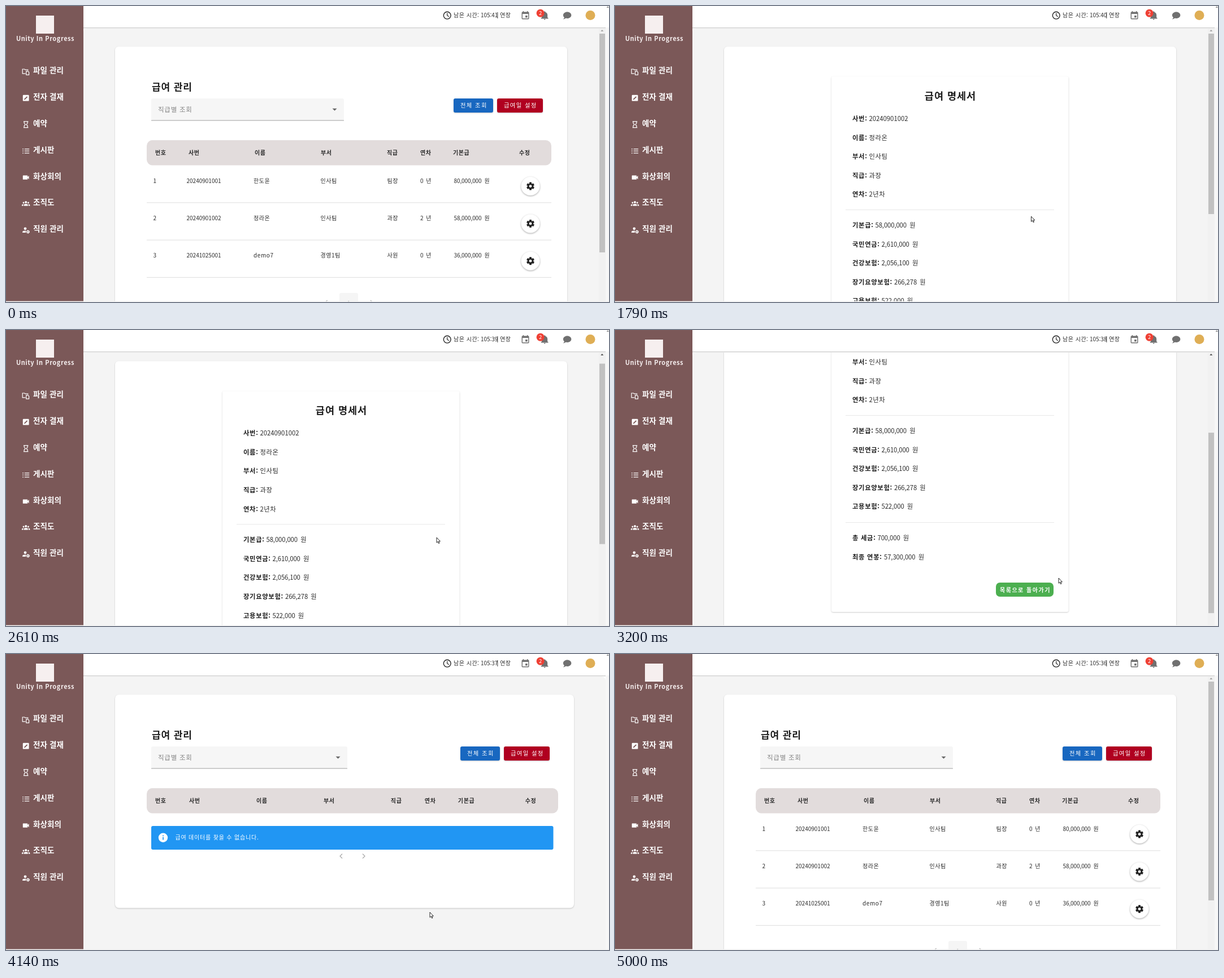
These frames come from a looping animation (1067x525 px, 5140 ms). An HTML page:

```html
<!DOCTYPE html>
<html lang="ko">
<head>
<meta charset="utf-8">
<title>급여 관리</title>
<style>
html, body { margin: 0; width: 100%; height: 100%; overflow: hidden; background: #fff; }
svg { display: block; width: 1067px; height: 525px; }
text { font-family: "Noto Sans CJK KR", "Noto Sans CJK", "Noto Sans CJK JP", sans-serif; white-space: pre; }
.card { filter: drop-shadow(0 1px 1px rgba(0,0,0,.2)); }
.fab { filter: drop-shadow(0 1px 1.5px rgba(0,0,0,.35)); }
.won { word-spacing: 2.2px; }
</style>
</head>
<body>
<svg id="stage" viewBox="0 0 1067 525"></svg>
<script>
const LOOP = 5140;
const INK = '#2b2b2b';

// [first, last, count] of evenly spaced screen updates
const RUNS = [
  [0, 0, 1], [150, 640, 8], [740, 1140, 6], [1270, 1470, 4],
  [1660, 1920, 4], [1990, 2140, 3], [2210, 2420, 4], [2610, 3070, 8],
  [3140, 3200, 2], [3270, 3470, 4], [3930, 4140, 4], [4200, 4400, 4],
  [4470, 4740, 5], [5000, 5000, 1]
];
const ticks = RUNS.flatMap(([a, b, n]) =>
  Array.from({ length: n }, (_, i) => Math.floor(a + (b - a) * i / Math.max(1, n - 1))));

// time, x, y
const POINTER = [
  [150, 1036, 514], [360, 930, 420], [500, 850, 350], [640, 800, 318],
  [740, 786, 322], [900, 760, 345], [1140, 736, 370], [1660, 736, 371],
  [1920, 737.5, 377.5], [2140, 737.5, 377.5], [2420, 762, 368], [2610, 762, 368],
  [3070, 812, 425], [3140, 800, 432], [3200, 785, 440], [3470, 750, 458],
  [4400, 750, 458], [4680, 1014, 513]
];
const SCROLL = [[2540, 0], [2610, 16.8], [2870, 140], [3000, 193], [3070, 210]];
const VIEWS = [[0, 'list'], [1740, 'slip'], [4000, 'empty'], [4260, 'list']];
const CLOCK = [[0, 41], [900, 40], [1900, 39], [2930, 38], [3930, 37], [5000, 36]];

const rect = (x, y, w, h, fill, r = 0, more = '') =>
  `<rect x="${x}" y="${y}" width="${w}" height="${h}" rx="${r}" fill="${fill}" ${more}/>`;
const text = (x, y, str, size, { fill = INK, bold = 0, ls = 0, mid = 0, more = '' } = {}) =>
  `<text x="${x}" y="${y}" font-size="${size}" fill="${fill}" letter-spacing="${ls}" ` +
  `font-weight="${bold ? 700 : 400}" ${mid ? 'text-anchor="middle"' : ''} ${more}>${str}</text>`;
const won = (x, y, str, size) => text(x, y, str, size, { ls: -.1, more: 'class="won"' });
const path = (d, more) => `<path d="${d}" ${more}/>`;
const line = (d, color, w = 1) => path(d, `fill="none" stroke="${color}" stroke-width="${w}"`);
const icon = (x, y, k, body) => `<g transform="translate(${x} ${y}) scale(${k})">${body}</g>`;
const group = (id, body, more = '') => `<g id="${id}" ${more}>${body}</g>`;

const PEN = 'fill="none" stroke="#fff" stroke-width="2"';
const MENU = [
  ['파일 관리', path('M11 18H2V5H8L10 7H18V9', PEN) + path('M13 11H18L21 14V22H13Z', PEN)],
  ['전자 결재', rect(3, 3, 18, 18, '#fff', 2) + line('M7.5 16.5L16 8', '#7b5858', 3)],
  ['예약', path('M7 3H17V8L13.5 12L17 16V21H7V16L10.500 12L7 8ZM5 3H19M5 21H19', PEN)],
  ['게시판', path('M2 6H5M2 12H5M2 18H5M8 6H22M8 12H22M8 18H22', PEN)],
  ['화상회의', path('M17 10.5V7Q17 6 16 6H4Q3 6 3 7V17Q3 18 4 18H16Q17 18 17 17V13.500L21 17.500V6.500Z', 'fill="#fff"')],
  ['조직도', '<g fill="#fff"><circle cx="12" cy="8.500" r="3.300"/><circle cx="5" cy="10" r="2.300"/><circle cx="19" cy="10" r="2.300"/>' +
    '<path d="M6 19V17Q6 13.500 12 13.500T18 17V19ZM0 19V17Q0 14 5 14Q4 16 4 19ZM24 19V17Q24 14 19 14Q20 16 20 19Z"/></g>'],
  ['직원 관리', '<g fill="#fff"><circle cx="10" cy="8" r="4"/><path d="M2 20V18Q2 14 10 14Q12 14 12.500 14.300Q10.500 17 12 20Z"/></g>' +
    '<circle cx="18" cy="17.500" r="3" fill="none" stroke="#fff" stroke-width="2.600"/>' +
    '<circle cx="18" cy="17.500" r="4.600" fill="none" stroke="#fff" stroke-width="1.500" stroke-dasharray="2.400"/>']
];

function sidebar() {
  const items = MENU.map(([label, art], i) => {
    const y = Math.round(114 + i * 46.88);
    return icon(28, y - 5, .6, art) + text(48, y + 5, label, 13.5, { fill: '#fff', bold: 1, ls: .1 });
  });
  return rect(0, 0, 137, 524, '#7b5858') + rect(53, 17, 32, 32, '#f6efef') +
    text(69.5, 62, 'Unity In Progress', 11, { fill: '#f6efef', bold: 1, ls: .55, mid: 1 }) + items.join('');
}

function topbar() {
  const grey = 'fill="#707070"';
  return rect(137, 0, 930, 38, '#fff') + rect(137, 38, 924, 1, '#cfcfcf') + rect(137, 39, 924, 1, '#e9e9e9') +
    path('M1062.500 3L1065 .5L1067 3Z', 'fill="#8a8a8a"') +
    '<circle cx="780.7" cy="16.700" r="6.400" fill="none" stroke="#222" stroke-width="1.400"/>' +
    line('M780.7 12.500V17L784 18.800', '#222', 1.2) +
    text(792, 20, '남은 시간:', 10, { ls: .5 }) +
    text(840, 20, '', 9.9, { more: 'id="clock"' }) +
    rect(869.3, 11, 1, 11, '#333') + text(874, 20, '연장', 10, { ls: .5 }) +
    icon(910.4, 8.3, .72,
      path('M5 3H6V1H8V3H16V1H18V3H19Q21 3 21 5V19Q21 21 19 21H5Q3 21 3 19V5Q3 3 5 3ZM5 8V19H19V8Z', grey + ' fill-rule="evenodd"') +
      rect(12, 12, 5, 5, '#707070')) +
    icon(944.5, 8, .72, path('M21 19V20H3V19L5 17V11C5 7.900 7 5.200 10 4.300V4A2 2 0 0 1 14 4V4.300C17 5.200 19 7.900 19 11V17ZM14 21A2 2 0 0 1 10 21Z', grey)) +
    '<circle cx="945.6" cy="12.800" r="7" fill="#ef4034"/>' +
    text(945.6, 16.2, '2', 9.5, { fill: '#fff', mid: 1 }) +
    icon(984.5, 8.3, .72, path('M12 3C6.500 3 2 6.600 2 11C2 13.200 3 15.200 4.700 16.500C4.700 17 4.300 18.700 2 21C4.400 20.900 6.600 20 8.500 18.500C9.600 18.800 10.800 19 12 19C17.500 19 22 15.400 22 11S17.500 3 12 3Z', grey)) +
    '<circle cx="1034" cy="16.500" r="8.500" fill="#dfae55"/>';
}

const HEADS = [['번호', 0], ['사번', 59], ['이름', 176], ['부서', 293], ['직급', 410], ['연차', 469], ['기본급', 527], ['수정', 644]];

// Shared upper part of the payroll page; extra is the width gained without a scrollbar
function listTop(extra) {
  const sel = 341 + extra / 2, k = (716 + extra) / 716, x = 257 + sel;
  const button = (bx, w, fill, label) =>
    rect(bx + extra, 164, w, 25, fill, 3, 'class="card"') +
    text(bx + extra + 12, 180.3, label, 10.3, { fill: '#fff', ls: 1.4 });
  return text(258, 150, '급여 관리', 17, { bold: 1, ls: .9, fill: '#1d1d1d' }) +
    rect(257, 164, sel, 39, '#f6f6f6', 3) + rect(257, 202.5, sel, 1, '#a0a0a0') +
    text(269, 187.5, '직급별 조회', 11.5, { fill: '#858585', ls: .75 }) +
    path(`M${x - 20.5} 181.800h8l-4 4z`, 'fill="#666"') +
    button(792, 70, '#1867c0', '전체 조회') + button(869, 81, '#b00020', '급여일 설정') +
    rect(249, 238, 716 + extra, 44.5, '#e2dcdc', 10) +
    HEADS.map(([h, dx]) => text(264 + dx * k, 263.5, h, 10, { bold: 1, ls: .6 })).join('');
}

const chevrons = (a, b, y) =>
  line(`M${a + 2} ${y - 4}l-4 4l4 4M${b - 2} ${y - 4}l4 4l-4 4`, '#a8a8a8', 1.2);

const ROWS = [
  ['1', '20240901001', '한도윤', '인사팀', '팀장', '0 년', '80,000,000 원'],
  ['2', '20240901002', '정라온', '인사팀', '과장', '2 년', '58,000,000 원'],
  ['3', '20241025001', 'demo7', '경영1팀', '사원', '0 년', '36,000,000 원']
];
const CELL_X = [260.5, 319.5, 438, 556.5, 674.5, 733];
const CELL_LS = [0, 0, .6, .5, .5, 1];
const ROW_H = 66.3;

function gear(y) {
  const teeth = [0, 60, 120].map(a => rect(-2, -7, 4, 14, '#222', .8, `transform="rotate(${a})"`)).join('');
  return `<g transform="translate(928 ${y})"><circle r="16.500" fill="#fff" class="fab"/>${teeth}` +
    '<circle r="5.200" fill="#222"/><circle r="2.400" fill="#fff"/></g>';
}

function listView() {
  const rows = ROWS.map((cells, i) => {
    const y = i * ROW_H, base = 313.5 + y;
    return rect(249, 290.5 + y, 716, 57.5, '#f9f9f9', 0, 'class="hover"') +
      CELL_X.map((x, j) => text(x, base, cells[j], 10, { ls: CELL_LS[j] })).join('') +
      won(792.5, base, cells[6], 10) +
      rect(249, 348.3 + y, 716, 1, '#dedede') + gear(319.6 + y);
  });
  return rect(193, 72, 800, 520, '#fff', 6, 'class="card"') + listTop(0) + rows.join('') +
    rect(590, 509, 33, 33, '#f5f5f5', 3) + text(606.5, 531, '1', 10, { mid: 1, fill: '#777' }) +
    chevrons(566.5, 647, 526);
}

function emptyView() {
  return rect(193, 72, 812, 378.5, '#fff', 7, 'class="card"') + listTop(12) +
    rect(257, 305, 711.5, 42, '#2196f3', 3) +
    '<circle cx="278" cy="325.700" r="8.200" fill="#fff"/>' +
    rect(277.2, 324.6, 1.7, 5, '#2196f3') + rect(277.2, 321.4, 1.7, 1.7, '#2196f3') +
    text(299.5, 329.3, '급여 데이터를 찾을 수 없습니다.', 10, { fill: '#fff', ls: .8 }) +
    chevrons(593, 633, 358.5);
}

const SLIP = [
  [204, [['사번', '20240901002', 449.5], ['이름', '정라온', 449.5], ['부서', '인사팀', 449.5], ['직급', '과장', 449.5], ['연차', '2년차', 449.5]]],
  [393, [['기본급', '58,000,000 원', 460.5], ['국민연금', '2,610,000 원', 471.5], ['건강보험', '2,056,100 원', 471.5], ['장기요양보험', '266,278 원', 494], ['고용보험', '522,000 원', 471.5]]],
  [583, [['총 세금', '700,000 원', 464.5], ['최종 연봉', '57,300,000 원', 476]]]
];

function slipView() {
  const rows = SLIP.map(([top, items]) => items.map(([k, v, x], i) => {
    const y = top + i * 33.6;
    return text(420, y, k + ':', 11.3, { bold: 1, ls: .7, fill: '#1d1d1d' }) +
      (v.endsWith('원') ? won(x, y, v, 11.3) : text(x, y, v, 11.3, { ls: /^\d+$/.test(v) ? 0 : .6 }));
  }).join('')).join('');
  return rect(193, 72, 800, 720, '#fff', 6, 'class="card"') +
    rect(383, 125, 419.5, 585, '#fff', 3, 'class="card"') +
    text(593.5, 165.5, '급여 명세서', 17.5, { bold: 1, ls: 1, mid: 1, fill: '#1d1d1d' }) + rows +
    rect(408, 361, 369, 1, '#e8e8e8') + rect(408, 551, 369, 1, '#e8e8e8') +
    rect(674, 658, 102, 25, '#4caf50', 7) +
    text(681, 674.7, '목록으로 돌아가기', 10, { fill: '#fff', bold: 1, ls: 1.5 });
}

const $ = id => document.getElementById(id);
$('stage').innerHTML =
  '<clipPath id="pane"><rect x="137" y="40" width="924" height="484"/></clipPath>' +
  rect(0, 0, 1067, 525, '#fff') +
  path('M137 525V48Q137 40 145 40H1053Q1061 40 1061 48V525Z', 'fill="#f4f4f4"') +
  '<g clip-path="url(#pane)">' +
  group('list', listView()) + group('empty', emptyView()) + group('slip', slipView()) + '</g>' +
  group('bar', rect(1049, 40, 12, 485, '#f1f1f1') +
    path('M1052.300 45L1054.800 42L1057.300 45Z', 'id="up"') +
    rect(1050, 49, 10, 388, '#c1c1c1', 0, 'id="thumb"')) +
  rect(1061, 0, 6, 525, '#f7f7f7') + topbar() + sidebar() + rect(0, 523.5, 1067, 1.5, '#f2f2f2') +
  group('pointer',
    path('M0 0V9.200L2.200 7.300L3.600 10.600L5 10L3.600 6.800H6.400Z', 'id="arrow"') +
    path('M-1 1A1 1 0 0 1 1 1V5.500L4.200 6.200Q5.500 6.500 5.300 8L4.600 12.700H-1.200L-4 8.500Q-4 7 -2.400 7.600L-1 8.800Z', 'id="hand"'),
    'fill="#fff" stroke="#111" stroke-width=".9" stroke-linejoin="round"');

const hovers = [...document.querySelectorAll('.hover')];
const show = (el, on) => { el.style.display = on ? '' : 'none'; };
const held = (table, t) => table.filter(e => e[0] <= t).pop()[1];

function blend(table, t, col) {
  const i = table.findIndex(e => e[0] > t);
  if (i === 0) return table[0][col];
  if (i < 0) return table[table.length - 1][col];
  const a = table[i - 1], b = table[i];
  return a[col] + (b[col] - a[col]) * (t - a[0]) / (b[0] - a[0]);
}

function draw(now) {
  const t = ticks.filter(k => k <= now).pop();
  const view = held(VIEWS, t);
  const scroll = blend(SCROLL, t, 1);
  const x = blend(POINTER, t, 1), y = blend(POINTER, t, 2);
  const visible = t >= 150 && t < 4740;

  for (const id of ['list', 'slip', 'empty']) show($(id), id === view);
  $('slip').setAttribute('transform', `translate(0 ${-scroll})`);
  $('clock').textContent = '105:' + held(CLOCK, t);

  const slip = view === 'slip';
  show($('bar'), view !== 'empty');
  $('thumb').setAttribute('y', 49 + (slip ? scroll * .634 : 0));
  $('thumb').setAttribute('height', slip ? 320 : 388);
  $('up').setAttribute('fill', slip && scroll ? '#505050' : '#a3a3a3');

  const onTable = visible && view === 'list' && x > 249 && x < 965;
  const row = onTable ? Math.floor((y - 283) / ROW_H) : -1;
  hovers.forEach((el, i) => show(el, i === row));
  const onButton = slip && x > 674 && x < 776 && y > 658 - scroll && y < 683 - scroll;
  const hand = onButton || (row >= 0 && row < 3);
  show($('pointer'), visible);
  show($('hand'), hand);
  show($('arrow'), !hand);
  $('pointer').setAttribute('transform', `translate(${x} ${y})`);
}

const start = performance.now();
function frame() {
  draw((performance.now() - start) % LOOP);
  requestAnimationFrame(frame);
}
frame();
</script>
</body>
</html>
```
